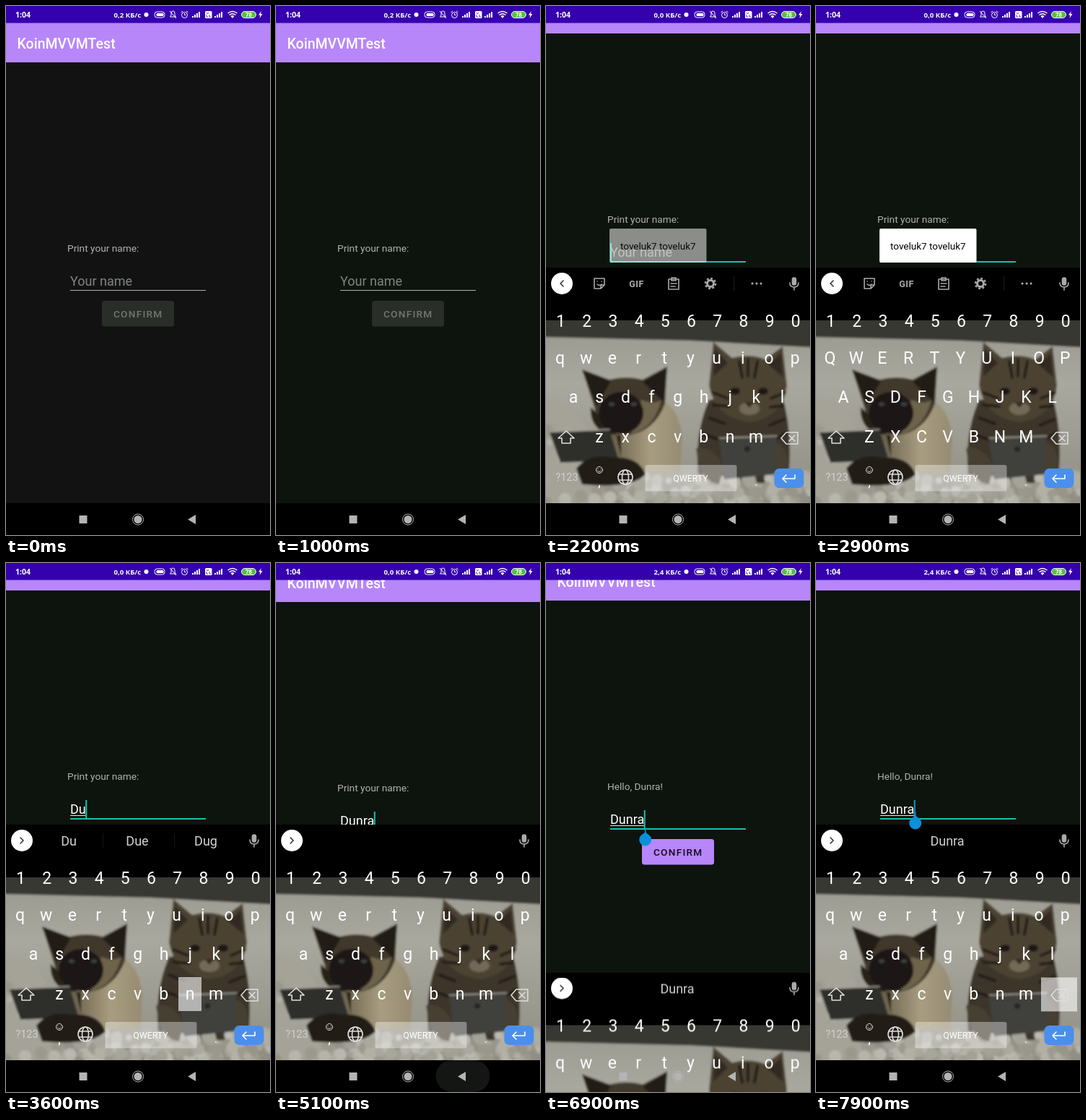
Write an HTML page that moves like this. It is 366 by 732 pixels and loops after 8 s.

```html
<!DOCTYPE html>
<html lang="en">
<head>
<meta charset="utf-8">
<title>Name form</title>
<style>
  html, body { margin: 0; width: 100%; height: 100%; overflow: hidden; background: #000; }
  svg { display: block; }
  text { font-family: Roboto, "Noto Sans", sans-serif; }
  .mid { text-anchor: middle; }
  .field { font-size: 18px; }
  .label { font-size: 13.7px; fill: #b0b3b0; }
  .caps { font: 500 13.6px Roboto, sans-serif; letter-spacing: 1.25px; }
  .key { font-size: 23px; fill: #fff; text-anchor: middle; }
  .word { font-size: 18px; fill: #d0d2d0; text-anchor: middle; }
  .status text { font-family: "Noto Sans", "Open Sans", sans-serif; font-weight: 700; fill: #fff; }
  .line { fill: none; stroke-width: 1.6; stroke-linecap: round; stroke-linejoin: round; }
</style>
</head>
<body>
<svg width="366" height="732" viewBox="0 0 366 732">
  <defs>
    <filter id="soft" x="0" y="0" width="1" height="1"><feGaussianBlur stdDeviation="1.6"/></filter>
    <clipPath id="photoClip"><path d="M0 435h366v253H0z"/></clipPath>
    <linearGradient id="bed" x2="0" y2="1">
      <stop stop-color="#97968d"/><stop offset=".35" stop-color="#a9a89e"/><stop offset="1" stop-color="#8d8b80"/>
    </linearGradient>
    <linearGradient id="chest">
      <stop stop-color="#5d5441"/><stop offset=".6" stop-color="#a89d80"/><stop offset="1" stop-color="#958b72"/>
    </linearGradient>
  </defs>

  <g id="app">
    <path id="page" d="M0 23h366v665H0z" fill="#0d130d"/>
    <path d="M0 23h366v55H0z" fill="#b786f8"/>
    <text x="15.500" y="58.500" font-size="19.5" font-weight="500" fill="#fff">KoinMVVMTest</text>
    <text id="prompt" class="label" x="85" y="340">Print your name:</text>
    <text id="greeting" class="label" x="85" y="340"></text>
    <text id="hint" class="field" x="89" y="387" fill="#808580">Your name</text>
    <path id="idleLine" d="M89 393h188v1H89z" fill="#b0b0b0"/>
    <path id="focusLine" d="M89 393h188v2H89z" fill="#14c4b0"/>
    <path id="hintCaret" d="M89 368h2v25h-2z" fill="#14c4b0"/>
    <g id="typed"></g>
    <g id="buttonOff">
      <rect x="133" y="408" width="100" height="35.500" rx="3.500" fill="#292e29"/>
      <text class="caps" x="149" y="430.500" fill="#737773">CONFIRM</text>
    </g>
    <g id="buttonOn">
      <rect x="133" y="408" width="100" height="35.500" rx="3.500" fill="#b786f8"/>
      <rect id="press" x="133" y="408" width="100" height="35.500" rx="3.500" fill="#fff" opacity="0"/>
      <text class="caps" x="149" y="430.500" fill="#120a1c">CONFIRM</text>
    </g>
  </g>

  <g id="popup">
    <rect x="88" y="308" width="134.500" height="47" rx="2" fill="#fff"/>
    <text x="103" y="337" font-size="13.5" fill="#000">toveluk7 toveluk7</text>
  </g>

  <g id="keyboard">
    <path d="M0 362h366v770H0z"/>
    <g clip-path="url(#photoClip)"><g id="photo" filter="url(#soft)">
      <path d="M-9 425h390v280H-9z" fill="url(#bed)"/>
      <path d="M-9 425h390v48L200 463L-9 458z" fill="#393930"/>
      <path d="M-9 545Q30 540 55 580L90 700H-9z" fill="#a5a398"/>
      <!-- left cat -->
      <path d="M150 540Q186 552 189 600L186 645H80L88 570z" fill="url(#chest)"/>
      <path d="M50 503L88 517Q112 511 134 517L168 499L165 550Q150 590 112 594Q74 588 66 552z" fill="#41392b"/>
      <path d="M132 545Q150 552 160 545Q150 585 118 592z" fill="#6e634b"/>
      <path d="M50 503L90 519L70 553zM168 499L134 520L163 548z" fill="#201b14"/>
      <path d="M62 555Q60 580 82 592L104 594V625L96 588z" fill="#282219"/>
      <ellipse cx="104" cy="563" rx="31" ry="29" fill="#1d1913"/>
      <ellipse cx="91" cy="551" rx="4" ry="2.500" fill="#3d4340"/>
      <ellipse cx="122" cy="551" rx="4" ry="2.500" fill="#3d4340"/>
      <!-- right cat -->
      <path d="M226 545Q204 595 212 660H335Q344 590 326 535z" fill="#3c3529"/>
      <path d="M232 465L258 487Q282 480 304 489L328 471L334 525Q330 568 283 576Q234 570 226 525z" fill="#4b4333"/>
      <path d="M234 474L252 494L232 513zM326 480L308 496L329 514z" fill="#322b20"/>
      <path class="line" d="M268 492l4 22M280 489v23M293 492l-4 22M232 535l20 8M331 535l-19 8M232 552l22 2M329 553l-18 2M216 592l24 8M333 590l-12 8M226 570l22 8M330 572l-20 8" stroke="#241f16" style="stroke-width:4"/>
      <ellipse cx="262" cy="533" rx="7" ry="5" fill="#1b1912"/>
      <ellipse cx="301" cy="533" rx="7" ry="5" fill="#1b1912"/>
      <ellipse cx="282" cy="557" rx="14" ry="9" fill="#736a56"/>
      <path d="M275 548h14l-7 8z" fill="#392a20"/>
      <g id="rug"></g>
      <!-- tablets and paws -->
      <path d="M5 590L88 587L101 628L20 632z" fill="#2d2e2c"/>
      <path d="M42 640Q60 618 92 625Q128 622 138 648Q120 668 50 662z" fill="#211d16"/>
      <path d="M240 599L320 596L317 648L247 655z" fill="#40413e"/>
      <path class="line" d="M5 589L88 586M240 598L320 595" stroke="#a3a298"/>
      <circle cx="279" cy="613" r="4" fill="#262724"/>
      <path d="M208 612Q234 608 246 640L240 662Q214 660 208 612zM318 605Q340 610 333 650L318 648z" fill="#463f30"/>
    </g></g>
    <g id="keys"></g>
    <g class="line" stroke="#dedede">
      <path d="M28 588l11 10h-5v7H22v-7h-5z"/>
      <path d="M326 598l7-8h16v16h-16zM337 594l8 8m0-8l-8 8"/>
      <circle cx="110" cy="652" r="10"/><ellipse cx="110" cy="652" rx="4.500" ry="10"/><path d="M101 648h18m-18 8h18"/>
      <circle cx="74" cy="642" r="4.500" stroke-width="1"/><path d="M71.500 643q2.500 3 5 0M72 640.500h.1M76 640.500h.1" stroke-width="1"/>
    </g>
    <text x="29" y="657" font-size="14.5" class="mid" fill="#d0d0d0">?123</text>
    <text x="74" y="665" class="mid" font-size="18" fill="#fff">,</text>
    <text x="291" y="664" class="mid" font-size="20" fill="#ddd">.</text>
    <rect x="137.500" y="635" width="127" height="36.500" rx="3" fill="#fff" opacity=".36"/>
    <text x="200.500" y="658" font-size="12.4" class="mid" fill="#fff">QWERTY</text>
    <rect x="316.500" y="640" width="41" height="27" rx="7" fill="#4b8fec"/>
    <path class="line" d="M345 649v5h-17m5-5l-5 5l5 5" stroke="#fff"/>
    <circle cx="22" cy="384" r="15" fill="#fff"/>
    <path id="chevronLeft" class="line" d="M24 380l-4 4l4 4" stroke="#333"/>
    <path id="chevronRight" class="line" d="M20 380l4 4l-4 4" stroke="#333"/>
    <g stroke="#a9aba9" class="line">
      <rect x="341.500" y="376" width="5" height="10" rx="2.500" fill="#a9aba9"/>
      <path d="M338 383q0 6 6 6t6-6M344 389v4"/>
    </g>
    <g id="tools">
      <g class="line" stroke="#a9aba9">
        <path d="M67 377h14v9l-5 5h-9zM81 386h-5v5M71 381h.1M77 381h.1M71 385q3 3 6 0"/>
        <path d="M170 378h14v14h-14zM174 376h6v4h-6zM173 384h8M173 388h6"/>
        <circle cx="228" cy="384" r="4.500" style="stroke-width:3"/>
        <circle cx="228" cy="384" r="7" stroke-dasharray="2.750" style="stroke-width:2.500;stroke-linecap:butt"/>
      </g>
      <text x="125.500" y="388.500" font-size="12.5" font-weight="700" letter-spacing=".5" class="mid" fill="#a9aba9">GIF</text>
      <path d="M260 374h1v20h-1z" fill="#1c1c1c"/>
      <path d="M286 384h.1m5.900 0h.1m5.900 0h.1" stroke="#a9aba9" stroke-width="3" stroke-linecap="round"/>
    </g>
    <g id="suggestions"></g>
  </g>

  <g id="handle" fill="#0b90dc">
    <path d="M137 385h1.500v10h-1.500z"/><path d="M137.700 389l6 6h-12z"/><circle cx="137.700" cy="400" r="8.500"/>
  </g>

  <rect id="backRipple" x="221.500" y="688" width="75" height="44" rx="22" fill="#141614"/>
  <g fill="#b4b4b4">
    <path d="M101.500 705h11v11h-11zM252 710.500l11-6.500v13z"/>
    <circle cx="183" cy="710.500" r="5.500"/>
    <circle cx="183" cy="710.500" r="7.500" fill="none" stroke="#b4b4b4"/>
  </g>

  <g class="status" fill="#fff">
    <path d="M0 0h366v23.500H0z" fill="#3500ae"/>
    <text x="13" y="15.500" font-size="10.5">1:04</text>
    <g id="speeds"></g>
    <circle cx="194.500" cy="12" r="3"/>
    <g fill="none" stroke="#fff">
      <rect x="206" y="8" width="14" height="8" rx="3.500"/>
      <path d="M227.500 15h8l-1.500-2V10q0-3-2.500-3t-2.500 3v3zM227 7l9 10"/>
      <circle cx="247.500" cy="12.500" r="4"/><path d="M247.500 10v2.500h2M242.500 9l2.500-2m5 0l2.500 2"/>
      <path d="M307.500 10q6.500-5 13 0M309.500 12.500q4.500-3.500 9 0" stroke-width="1.500"/>
    </g>
    <rect x="208.500" y="10" width="10" height="4" rx="1.500"/>
    <path id="bars" d="M258 16v-2h2v2zm3 0v-4h2v4zm3 0v-6h2v6zm3 0v-8h2v8z"/>
    <use href="#bars" x="31"/>
    <rect x="276" y="7" width="9.500" height="10" rx="1.500"/>
    <path d="M278 9l1.500 2l1.500-2M278 12v3h2M282 12v3h2" fill="none" stroke="#3500ae" stroke-width=".8"/>
    <path d="M311.500 14l2.500 3l2.500-3q-2.500-2-5 0zM354 7l-4 5.500h2.500l-1 4.500l4-6H353z"/>
    <rect x="326.500" y="7.500" width="20" height="9" rx="4.500" fill="#58bd46" stroke="#fff"/>
    <text x="336.500" y="15" font-size="8" class="mid">78</text>
  </g>
</svg>

<script>
const LOOP = 8000;
const NAME = 'Dunra';
const TYPED_AT = [3100, 3500, 3700, 4100, 4500];
const $ = id => document.getElementById(id);

function add(parent, tag, attrs, content = '') {
  const el = document.createElementNS('http://www.w3.org/2000/svg', tag);
  for (const name in attrs) el.setAttribute(name, attrs[name]);
  el.textContent = content;
  return parent.appendChild(el);
}

// points: [ms, value]; every value holds until the next one
function play(el, prop, points) {
  const steps = points.map(([ms, value]) => ({ offset: ms / LOOP, [prop]: value, easing: 'step-end' }));
  steps.push({ offset: 1, [prop]: points.at(-1)[1] });
  el.animate(steps, { duration: LOOP, iterations: Infinity });
}

function show(el, ...spans) {
  const points = spans[0][0] > 0 ? [[0, 0]] : [];
  for (const [from, to] of spans) {
    points.push([from, 1]);
    if (to < LOOP) points.push([to, 0]);
  }
  play(el, 'opacity', points);
}

const slide = (el, points) =>
  play(el, 'transform', points.map(([ms, y]) => [ms, `translateY(${y}px)`]));

// Rug: seeded tufts along the lower edge
let seed = 11;
const random = () => (seed = seed * 16807 % 2147483647) / 2147483647;
for (let i = 0; i < 150; i++) {
  const x = random() * 366, light = 56 + random() * 16;
  add($('rug'), 'circle', {
    cx: x, cy: 690 - random() * (x < 50 ? 110 : 40), r: 4 + random() * 6,
    fill: `hsl(52 7% ${light}%)`
  });
}

// Keys
const keySpots = { shift: [29, 597, 50], back: [337, 597, 50] };
const lower = add($('keys'), 'g', {}), upper = add($('keys'), 'g', {});
[['1234567890', 20.5, 444], ['qwertyuiop', 19.5, 495], ['asdfghjkl', 38, 549], ['zxcvbnm', 74, 604]]
  .forEach(([row, left, y], rowIndex) => [...row].forEach((char, i) => {
    const x = left + i * 36.2;
    keySpots[char] = [x, y - 7.5, 32];
    add(rowIndex ? lower : $('keys'), 'text', { class: 'key', x, y }, char);
    if (rowIndex) add(upper, 'text', { class: 'key', x, y }, char.toUpperCase());
  }));
show(lower, [0, 2700], [3100, LOOP]);
show(upper, [2700, 3100]);

const presses = [['shift', 2600], ['back', 7900],
  ...[...NAME.toLowerCase()].map((char, i) => [char, TYPED_AT[i] - 100])];
for (const [key, at] of presses) {
  const [x, y, width] = keySpots[key];
  show(add($('keys'), 'rect', { x: x - width / 2, y: y - 23.5, width, height: 47, fill: '#fff', 'fill-opacity': .6 }),
    [at, at + 100]);
}

// Typed text with its composing underline and caret
TYPED_AT.forEach((from, i) => {
  const whole = i === NAME.length - 1, to = TYPED_AT[i + 1] ?? LOOP;
  const group = add($('typed'), 'g', {});
  const text = add(group, 'text', { class: 'field', x: 89, y: 387, fill: '#fff' }, NAME.slice(0, i + 1));
  const width = text.getComputedTextLength();
  const underline = add(group, 'rect', { x: 89, y: 389, width, height: 1, fill: '#e8e8e8' });
  const caret = add(group, 'rect', { x: 88.5 + width, y: 368, width: 2, height: 25, fill: '#14c4b0' });
  show(group, [from, to]);
  if (!whole) return;
  show(underline, [from, 5000], [6800, LOOP]);
  show(caret, [from, 5400], [5900, 6400], [6700, 7200], [7600, LOOP]);
  play(caret, 'fill', [[0, '#14c4b0'], [7100, '#1697bd']]);
});

// Suggestion strip
[[3100, 3500, 'D', 'Do', 'Did'], [3500, 3700, 'Du', 'Due', 'Dug'], [3700, 4100, 'Dun', 'Dune', 'Dunk'],
 [4100, 4500, '', 'Dunr', ''], [4500, 5000, '', NAME, ''], [6700, LOOP, '', NAME, '']]
  .forEach(([from, to, ...words]) => {
    const group = add($('suggestions'), 'g', {});
    words.forEach((word, i) => add(group, 'text', { class: 'word', x: 87 + i * 95, y: 390.5 }, word));
    if (words[0]) add(group, 'path', { d: 'M134 374h1v20h-1zM233 374h1v20h-1z', fill: '#141414' });
    show(group, [from, to]);
  });

[['0,2', 0, 2200], ['0,0', 2200, 6000], ['2,4', 6000, LOOP]].forEach(([rate, from, to]) =>
  show(add($('speeds'), 'text', { x: 149.5, y: 15.5, 'font-size': 9.6 }, rate + ' КБ/с'), [from, to]));

$('greeting').textContent = `Hello, ${NAME}!`;
show($('prompt'), [0, 6100]);
show($('greeting'), [6100, LOOP]);
show($('hint'), [0, 3100]);
show($('hintCaret'), [2100, 2600]);
show($('idleLine'), [0, 1600]);
show($('focusLine'), [1600, LOOP]);
show($('buttonOff'), [0, 3100]);
show($('buttonOn'), [3100, LOOP]);
show($('tools'), [0, 3100]);
show($('chevronLeft'), [0, 3100]);
show($('chevronRight'), [3100, LOOP]);
show($('backRipple'), [4900, 5400]);
show($('handle'), [6800, LOOP]);
play($('press'), 'opacity', [[0, 0], [6000, .18], [6100, .28], [6200, .18], [6300, .08], [6400, 0]]);
play($('popup'), 'opacity', [[0, 0], [2200, .52], [2300, 1], [3100, 0]]);
play($('page'), 'fill', [[0, '#121212'], [400, '#0d130d']]);

slide($('app'), [[0, 0], [1700, -17], [1800, -32], [1900, -38], [2000, -40],
  [5000, -35], [5100, -24], [5200, -9], [5300, 0],
  [6800, -12], [6900, -26], [7000, -36], [7100, -40]]);
slide($('handle'), [[0, 0], [6900, -17], [7000, -31], [7100, -40]]);
slide($('keyboard'), [[0, 372], [1900, 205], [2000, 65], [2100, 0],
  [5200, 45], [5300, 170], [5400, 300], [5500, 372],
  [6800, 330], [6900, 204.5], [7000, 65], [7100, 0]]);
</script>
</body>
</html>
```
